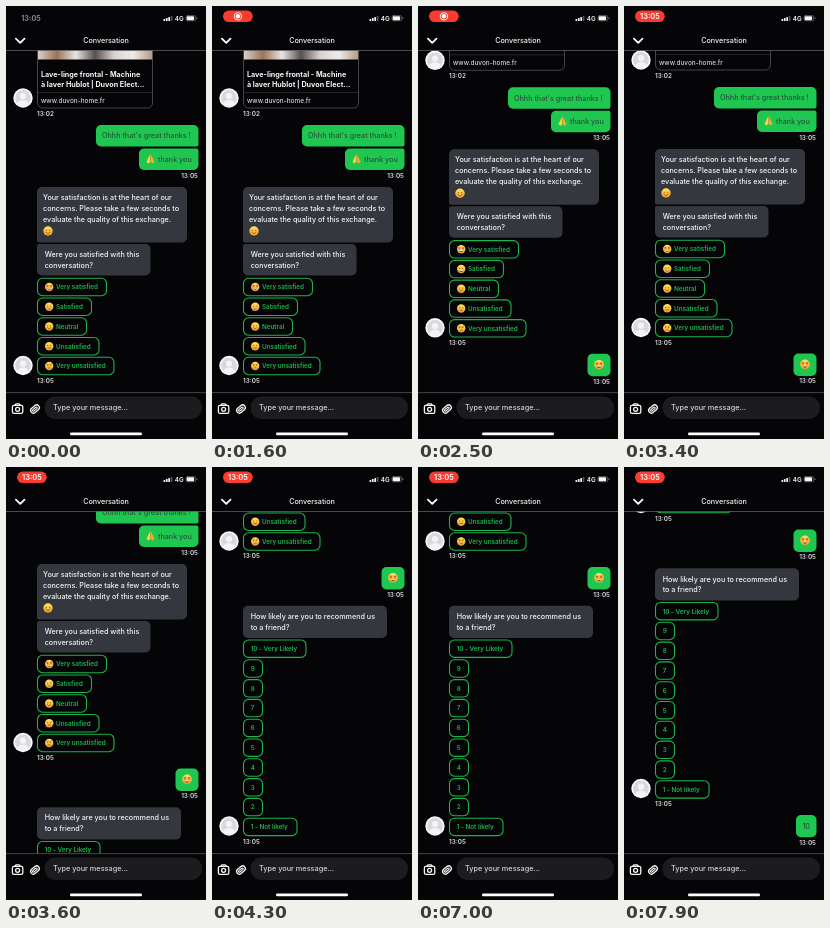
Recreate the animation shown at these times as an HTML page with a canvas. Size 200x433 px, loop 8000 ms.

```html
<!DOCTYPE html>
<html lang="en">
<head>
<meta charset="utf-8">
<title>Conversation</title>
<style>
html, body { margin: 0; width: 100%; height: 100%; overflow: hidden; background: #050406; }
canvas { display: block; width: 200px; height: 433px; }
</style>
</head>
<body>
<canvas id="stage"></canvas>
<script>
const W = 200, H = 433, LOOP = 8000;
const canvas = document.getElementById('stage');
const ctx = canvas.getContext('2d');
const dpr = window.devicePixelRatio || 1;
canvas.width = W * dpr;
canvas.height = H * dpr;

const BG = '#050406', GREEN = '#1fc750', OUTLINE = '#1db44c', GREY = '#34373d';
const ON_GREEN = '#28533a', WHITE = '#f7f7f8';

// Scroll steps: start, end, distance in px
const SCROLLS = [[2155, 2550, 38], [3450, 3870, 247.5], [7020, 7420, 37.5]];

const clamp = x => Math.min(1, Math.max(0, x));
const ease = x => x < .5 ? 4 * x ** 3 : 1 - (2 - 2 * x) ** 3 / 2;
const scrollAt = t => SCROLLS.reduce((sum, [a, b, d]) => sum + d * ease(clamp((t - a) / (b - a))), 0);

function text(str, x, y, { size = 7.2, weight = 450, color = WHITE, align = 'left' } = {}) {
  ctx.font = `${weight} ${size}px Inter, sans-serif`;
  ctx.textAlign = align;
  ctx.fillStyle = color;
  ctx.fillText(str, x, y);
}

function rect(x, y, w, h, color) {
  ctx.fillStyle = color;
  ctx.fillRect(x, y, w, h);
}

function box(x, y, w, h, r, fill, stroke, line = 1.1) {
  ctx.beginPath();
  ctx.roundRect(x, y, w, h, r);
  if (fill) { ctx.fillStyle = fill; ctx.fill(); }
  if (stroke) { ctx.strokeStyle = stroke; ctx.lineWidth = line; ctx.stroke(); }
}

function disc(x, y, r, color) {
  ctx.beginPath();
  ctx.arc(x, y, r, 0, Math.PI * 2);
  ctx.fillStyle = color;
  ctx.fill();
}

function path(points, color, width) {
  ctx.beginPath();
  points.forEach(([x, y]) => ctx.lineTo(x, y));
  ctx.strokeStyle = color;
  ctx.lineWidth = width;
  ctx.lineCap = ctx.lineJoin = 'round';
  ctx.stroke();
}

function gradient(x0, y0, x1, y1, colors) {
  const g = ctx.createLinearGradient(x0, y0, x1, y1);
  colors.forEach((c, i) => g.addColorStop(i / (colors.length - 1), c));
  return g;
}

function star(x, y, r) {
  ctx.beginPath();
  for (let i = 0; i < 10; i++) {
    const a = i * Math.PI / 5 - Math.PI / 2, d = i % 2 ? r * .5 : r;
    ctx.lineTo(x + d * Math.cos(a), y + d * Math.sin(a));
  }
  ctx.fillStyle = '#d8642c';
  ctx.fill();
}

function face(x, y, r, mood) {
  const ink = '#7d4a16';
  ctx.save();
  ctx.translate(x, y);
  ctx.scale(r, r);
  disc(0, 0, 1, gradient(0, -1, 0, 1, ['#ffe163', '#fdc43c', '#ee9a2b']));
  for (const side of [-1, 1]) {
    if (mood === 'star') star(side * .44, -.24, .4);
    else disc(side * .36, -.16, .13, ink);
    if (mood === 'blush') disc(side * .64, .2, .17, '#f39a4a');
    if (mood === 'angry') path([[side * .58, -.5], [side * .2, -.34]], ink, .12);
  }
  if (mood === 'star' || mood === 'open') {
    ctx.beginPath();
    ctx.arc(0, .2, .48, 0, Math.PI);
    ctx.closePath();
    ctx.fillStyle = ink;
    ctx.fill();
    rect(-.42, .18, .84, .22, '#fff');
  } else if (mood === 'flat') {
    path([[-.34, .42], [.34, .42]], ink, .14);
  } else {
    ctx.beginPath();
    if (mood === 'angry') ctx.arc(0, .74, .36, Math.PI * 1.15, Math.PI * 1.85);
    else ctx.arc(0, .08, .46, .4, Math.PI - .4);
    ctx.strokeStyle = ink;
    ctx.lineWidth = .14;
    ctx.stroke();
  }
  ctx.restore();
}

function hands(x, y) {
  for (const side of [-1, 1]) {
    ctx.beginPath();
    ctx.moveTo(x, y - 5);
    ctx.quadraticCurveTo(x + side * 2, y - 2, x + side * 4, y + 3);
    ctx.lineTo(x + side * 2, y + 4.6);
    ctx.lineTo(x, y + 2.4);
    ctx.fillStyle = side < 0 ? '#fbd04b' : '#f0ab35';
    ctx.fill();
  }
  path([[x, y - 3.6], [x, y + 1.6]], '#c97a25', .5);
}

function avatar(y) {
  disc(17, y, 9.7, '#fafafa');
  ctx.save();
  ctx.beginPath();
  ctx.arc(17, y, 7.9, 0, Math.PI * 2);
  ctx.clip();
  rect(9, y - 8, 16, 16, '#d9d9dd');
  disc(17, y - 1.8, 3.1, '#f4f4f6');
  ctx.beginPath();
  ctx.ellipse(17, y + 6, 5.6, 4, 0, 0, Math.PI * 2);
  ctx.fill();
  ctx.restore();
}

const stamp = (str, x, y, align) => text(str, x, y, { size: 6.35, weight: 600, color: '#dededf', align });

function option(y, right, label, mood) {
  box(31.5, y - 8.7, right - 31.5, 17.4, 5, null, OUTLINE);
  if (mood) face(43.2, y, 4.2, mood);
  text(label, mood ? 50 : 38.7, y + 2.3, { size: 6.3, weight: 600, color: OUTLINE });
}

function card() {
  rect(32, 30, 114.5, 23.5, gradient(32, 0, 146, 0,
    ['#d9d0ca', '#9c7358', '#e8e6e4', '#56514f', '#d8d3cf', '#eeeceb', '#b59a85']));
  box(31.5, 25, 115, 77, 5, null, '#55565b', .8);
  text('Lave-linge frontal - Machine', 35, 70.5, { weight: 700 });
  text('à laver Hublot | Duvon Elect...', 35, 81, { weight: 700 });
  rect(32, 86.3, 114, .6, '#3b3c40');
  text('www.duvon-home.fr', 35, 97, { size: 6.45, color: '#d5d5d8' });
  avatar(92);
  stamp('13:02', 31, 110);
}

function opening() {
  card();
  box(90, 119, 102.5, 21.5, [5, 5, 2, 5], GREEN);
  text("Ohhh that's great thanks !", 96, 132.3, { color: ON_GREEN });
  box(133, 142.5, 59.5, 21.5, [5, 2, 5, 5], GREEN);
  hands(144.5, 153);
  text('thank you', 152, 156, { color: ON_GREEN });
  stamp('13:05', 192, 172, 'right');

  box(31, 181, 150, 55.5, [5, 5, 5, 2], GREY);
  ['Your satisfaction is at the heart of our', 'concerns. Please take a few seconds to',
    'evaluate the quality of this exchange.'].forEach((line, i) => text(line, 37, 194 + i * 11));
  face(42, 225, 4.7, 'blush');

  box(31, 238, 113.5, 31.5, [2, 5, 5, 5], GREY);
  text('Were you satisfied with this', 38.7, 251);
  text('conversation?', 38.7, 261.8);

  [['Very satisfied', 100.5, 'star'], ['Satisfied', 85.5, 'open'], ['Neutral', 80.5, 'smile'],
    ['Unsatisfied', 93, 'flat'], ['Very unsatisfied', 108, 'angry']]
    .forEach(([label, right, mood], i) => option(281 + i * 19.75, right, label, mood));
  avatar(359.5);
  stamp('13:05', 31, 376.6);
}

function reply() {
  box(169.5, 385.5, 23, 22.5, 5, GREEN);
  face(181, 396.4, 4.8, 'star');
  stamp('13:05', 192, 415.4, 'right');
}

function rating() {
  box(31, 424.3, 144, 32.2, 5, GREY);
  text('How likely are you to recommend us', 38.7, 437.5);
  text('to a friend?', 38.7, 448.2);
  for (let n = 10; n >= 1; n--) {
    const label = n === 10 ? '10 - Very Likely' : n === 1 ? '1 - Not likely' : String(n);
    option(467.2 + (10 - n) * 19.8, n === 10 ? 94 : n === 1 ? 85 : 50.5, label);
  }
  avatar(644.5);
  stamp('13:05', 31, 662);
}

function score() {
  box(172, 671, 20.5, 22.3, 5, GREEN);
  text('10', 182.2, 684.8, { color: ON_GREEN, align: 'center' });
  stamp('13:05', 192, 700.5, 'right');
}

function statusBar(t) {
  const shown = clamp(t / 400);
  if (shown < 1) text('13:05', 25, 14.7, { size: 7.2, weight: 700, color: '#85858a', align: 'center' });
  ctx.globalAlpha = shown * (.98 + .02 * Math.cos(t * Math.PI / 1000));
  box(11, 4.5, 29.8, 11.6, 5.8, '#fd3d31');
  ctx.globalAlpha = shown;
  if (t < 2850) {
    ctx.beginPath();
    ctx.arc(25.9, 10.3, 3.7, 0, Math.PI * 2);
    ctx.strokeStyle = '#fff';
    ctx.lineWidth = .9;
    ctx.stroke();
    disc(25.9, 10.3, 2.2, '#fff');
  } else {
    text('13:05', 25.9, 13.1, { size: 7.5, weight: 600, color: '#fff', align: 'center' });
  }
  ctx.globalAlpha = 1;

  for (let i = 0; i < 4; i++) {
    const h = 2 + i;
    box(157.5 + i * 2.4, 15 - h, 1.7, h, .5, i < 3 ? WHITE : '#5a5a5e');
  }
  text('4G', 168.7, 14.8, { size: 6.3, weight: 600 });
  box(180, 9.6, 9.8, 5.2, 1.6, null, '#8b8b90', .6);
  box(180.7, 10.2, 7.4, 4, 1, WHITE);
  box(190.6, 11.3, .8, 1.8, .4, '#8b8b90');
}

function header(t) {
  rect(0, 0, W, 44, BG);
  rect(0, 44, W, .8, '#5b5b60');
  statusBar(t);
  path([[9.9, 32.6], [14.2, 36.9], [18.5, 32.6]], '#fff', 1.8);
  text('Conversation', 100, 36.9, { weight: 550, align: 'center' });
}

function footer() {
  rect(0, 386.5, W, H - 386.5, BG);
  rect(0, 386.3, W, .8, '#55555a');
  box(38.5, 390.5, 157.5, 22.5, 11.2, '#1c1c1f');
  text('Type your message...', 47, 403.8, { size: 7.3, color: '#d4d4d8' });

  box(6.4, 399.3, 10.4, 8, 1.6, null, WHITE, 1.3);
  path([[9, 399], [10, 397.8], [13.2, 397.8], [14.2, 399]], WHITE, 1.3);
  ctx.beginPath();
  ctx.arc(11.6, 403.3, 2, 0, Math.PI * 2);
  ctx.stroke();

  ctx.save();
  ctx.translate(29, 403);
  ctx.rotate(Math.PI * .28);
  box(-2.7, -4.8, 5.4, 9.6, 2.7, null, WHITE, 1.3);
  box(-.9, -2.6, 1.8, 5.6, .9, null, WHITE, 1.1);
  ctx.restore();

  box(64, 426.6, 72, 2.6, 1.3, '#fff');
}

function draw(t) {
  ctx.setTransform(dpr, 0, 0, dpr, 0, 0);
  rect(0, 0, W, H, BG);
  ctx.save();
  ctx.translate(0, -scrollAt(t));
  opening();
  if (t >= SCROLLS[0][0]) reply();
  if (t >= SCROLLS[1][0]) rating();
  if (t >= SCROLLS[2][0]) score();
  ctx.restore();
  header(t);
  footer();
}

const start = performance.now();
function tick() {
  draw((performance.now() - start) % LOOP);
  requestAnimationFrame(tick);
}
tick();
</script>
</body>
</html>
```
